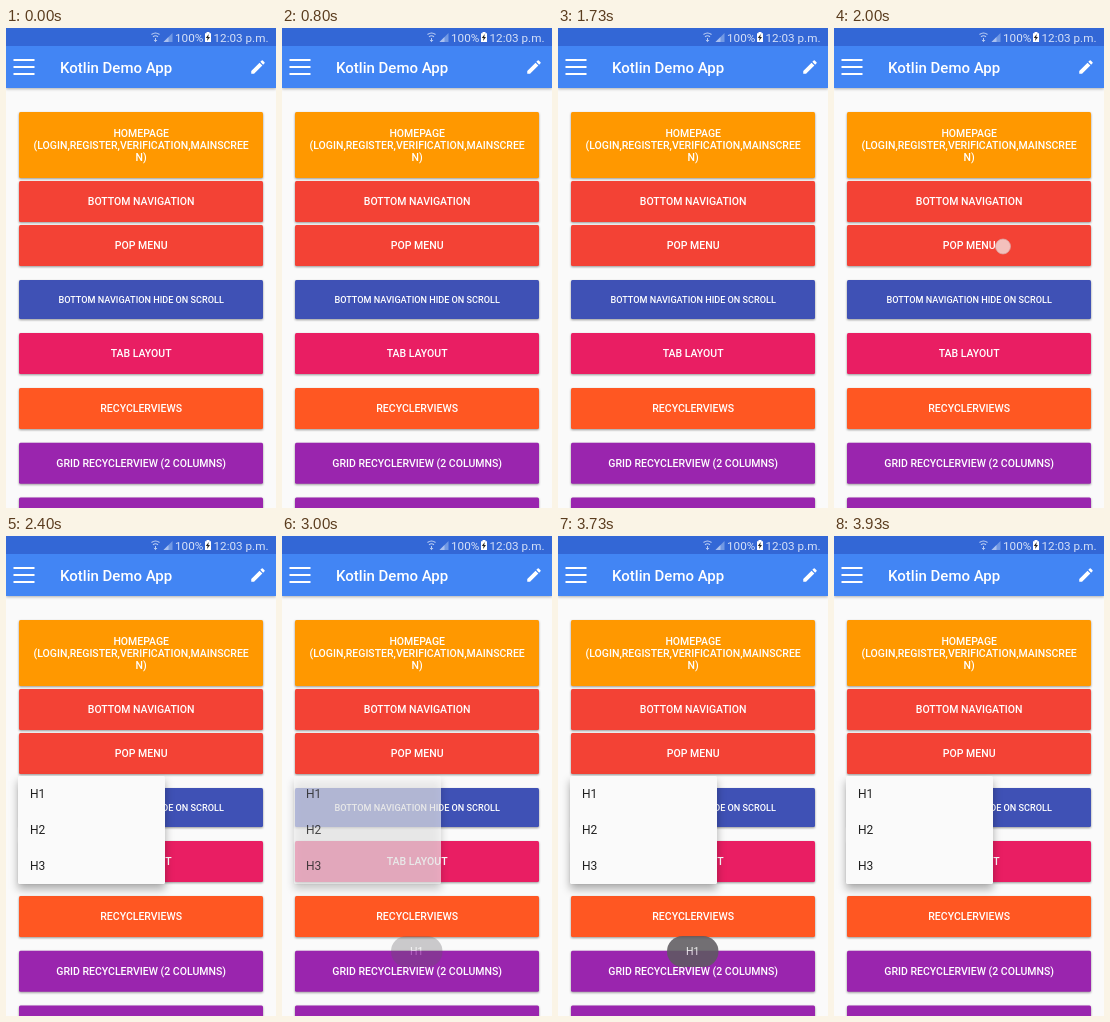
Animation, 270 px wide and 480 px high, one loop 3990 ms. Source, as an HTML page:

```html
<!DOCTYPE html>
<html lang="en">
<head>
<meta charset="utf-8">
<title>Kotlin Demo App</title>
<style>
  html, body { margin: 0; width: 100%; height: 100%; overflow: hidden; background: #fafafa; }
  svg { display: block; width: 100vw; height: 100vh; font-family: Roboto, sans-serif; }
  .title { font-size: 15px; font-weight: 500; fill: #fff; }
  .status { font-size: 11.7px; fill: #d6e1f8; }
  .bar { filter: drop-shadow(0 1px 1.5px rgba(0, 0, 0, .3)); }
  #buttons text { font-size: 10.5px; font-weight: 500; fill: #fff; text-anchor: middle; }
  #buttons .small { font-size: 9.1px; }
  #buttons rect { filter: drop-shadow(0 1px .8px rgba(0, 0, 0, .4)); }

  .popup > *, .toast, .touch { opacity: 0; animation: 3.99s linear infinite; }
  .popup > * { animation-name: popup; }
  .popup .shadow { fill: rgba(0, 0, 0, .32); filter: blur(4.5px); }
  .popup .labels { font-size: 12px; fill: #212121; animation-timing-function: ease-in; }
  .toast { font-size: 10.5px; fill: #f2f2f2; text-anchor: middle; animation-name: toast; }
  .touch { fill: #f3dcda; fill-opacity: .82; stroke: #d9a9a5; stroke-opacity: .7; }
  .open { animation-name: open; }
  .pick { animation-name: pick; fill: #e4e4e4; stroke: #c4c4c4; }

  @keyframes popup {
    0%, 55.1% { opacity: 0; }
    58.4%, 73.4% { opacity: 1; }
    78.4%, 90.2% { opacity: 0; }
    93.5%, 100% { opacity: 1; }
  }
  @keyframes toast {
    0%, 73.8% { opacity: 0; }
    78.2%, 93.2% { opacity: 1; }
    96.7%, 100% { opacity: 0; }
  }
  @keyframes open {
    0%, 47.6% { opacity: 0; }
    47.7%, 53.3% { opacity: 1; }
    53.4%, 81% { opacity: 0; }
    81.1%, 86.9% { opacity: 1; }
    87%, 100% { opacity: 0; }
  }
  @keyframes pick {
    0%, 68.2% { opacity: 0; }
    68.3%, 73.3% { opacity: 1; }
    73.4%, 100% { opacity: 0; }
  }
</style>
</head>
<body>
<svg viewBox="0 0 270 480" preserveAspectRatio="none">
  <rect width="270" height="480" fill="#fafafa"/>
  <g id="buttons"></g>

  <rect class="bar" width="270" height="60" fill="#4285f4"/>
  <rect width="270" height="18" fill="#3367d6"/>

  <g fill="none" stroke="#b9ccf3">
    <path d="M145.5 6.5q4-3 8 0M147 8.8q2.5-2 5 0" stroke-width="1.1"/>
    <path d="M149.5 10v3.5M147.9 12l1.6 1.6 1.6-1.6"/>
  </g>
  <path d="M157.5 14l9-9v9z" fill="#7299e4"/>
  <path d="M157.5 14l5-5v5z" fill="#a9c0f0"/>
  <path d="M200.5 4h3v1.2h1.5V14h-6V5.2h1.5z" fill="#fff"/>
  <path d="M202.8 6l-3 4h1.8l-.6 3 3-4h-1.8z" fill="#222"/>
  <text class="status" x="169" y="13.6">100%</text>
  <text class="status" x="207.5" y="13.6">12:03 p.m.</text>

  <path d="M7.5 32h21M7.5 39h21M7.5 46h21" stroke="#fff" stroke-width="2"/>
  <text class="title" x="54" y="45">Kotlin Demo App</text>
  <path transform="translate(243 30) scale(.75)" fill="#fff"
    d="M3 17.25V21h3.75L17.8 9.95 14.05 6.2zM20.7 7.05a1 1 0 0 0 0-1.4l-2.35-2.35a1 1 0 0 0-1.4 0L15.1 5.15 18.85 8.9z"/>

  <g class="popup">
    <rect class="shadow" x="12" y="245" width="147" height="108"/>
    <rect x="12" y="240" width="147" height="108" rx="1.5" fill="#fafafa"/>
    <g class="labels">
      <text x="24" y="262">H1</text>
      <text x="24" y="298">H2</text>
      <text x="24" y="334">H3</text>
    </g>
  </g>
  <g class="toast">
    <rect x="109" y="400" width="51.5" height="31" rx="15.5" fill="#5e5b60" fill-opacity=".96"/>
    <text x="134.7" y="419.4">H1</text>
  </g>
  <circle class="touch open" cx="169" cy="218.5" r="7.5"/>
  <circle class="touch pick" cx="76" cy="259" r="7.5"/>
</svg>
<script>
  const buttons = [
    [84, 66, '#ff9800', ['HOMEPAGE', '(LOGIN,REGISTER,VERIFICATION,MAINSCREE', 'N)']],
    [153, 41, '#f34235', ['BOTTOM NAVIGATION']],
    [197, 41, '#f34235', ['POP MENU']],
    [252, 39, '#3f51b5', ['BOTTOM NAVIGATION HIDE ON SCROLL'], 'small'],
    [305, 41, '#e91e63', ['TAB LAYOUT']],
    [360, 41, '#ff5722', ['RECYCLERVIEWS']],
    [414.7, 41, '#9a25ae', ['GRID RECYCLERVIEW (2 COLUMNS)']],
    [469.4, 41, '#9a25ae', []]
  ];
  const lineHeight = 12.3;

  document.getElementById('buttons').innerHTML = buttons.map(([y, h, fill, lines, cls = '']) => {
    const first = y + h / 2 + 3.8 - (lines.length - 1) * lineHeight / 2;
    const label = lines.map((line, i) =>
      `<text class="${cls}" x="135.2" y="${first + i * lineHeight}">${line}</text>`).join('');
    return `<rect x="13" y="${y}" width="244" height="${h}" rx="1.5" fill="${fill}"/>${label}`;
  }).join('');
</script>
</body>
</html>
```
